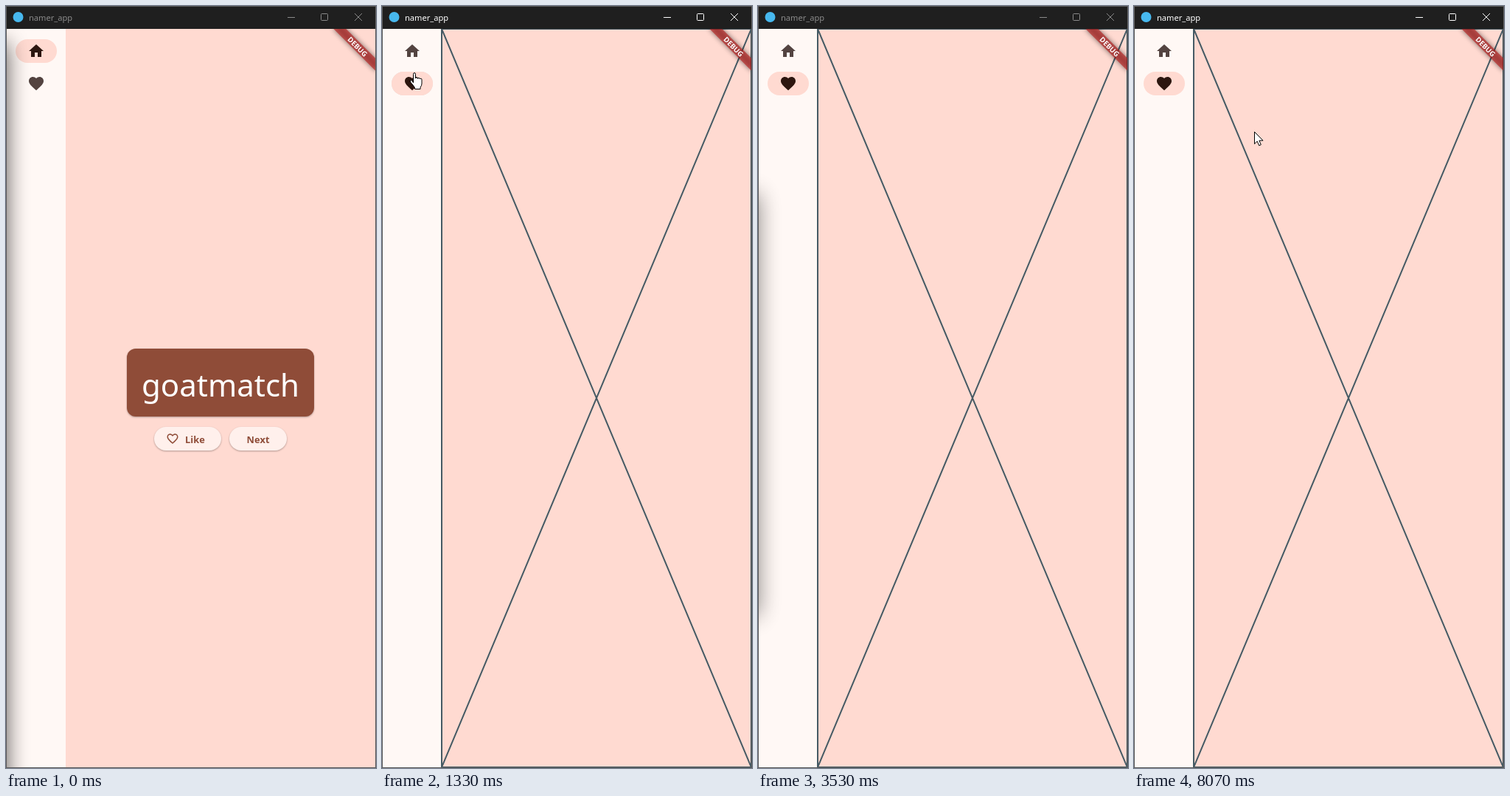
Animation, 502 px wide and 1032 px high, one loop 10000 ms. Source, as an HTML page:

```html
<!DOCTYPE html>
<html lang="en">
<head>
<meta charset="utf-8">
<title>namer_app</title>
<style>
html, body { margin: 0; width: 100%; height: 100%; overflow: hidden; background: #1f1f1f; }
svg { display: block; }
text { font-family: "Noto Sans", "Open Sans", sans-serif; }
.button { fill: #fff0ec; filter: drop-shadow(0 1px 1px rgba(0, 0, 0, .3)); }
.label { fill: #8f4c38; font-size: 12.8px; font-weight: 600; letter-spacing: .1px; }
.pill { fill: #ffdad1; }
.ink { fill: #221a18; }
.cursor { fill: #fff; stroke: #000; stroke-linejoin: round; }
</style>
</head>
<body>
<svg width="502" height="1032" viewBox="0 0 502 1032">
  <defs>
    <clipPath id="client"><rect x="1" y="31" width="500" height="1000"/></clipPath>
    <filter id="soft" x="-30%" y="-200%" width="160%" height="500%"><feGaussianBlur stdDeviation="3.96"/></filter>
    <filter id="wide" x="-30%" y="-30%" width="160%" height="160%"><feGaussianBlur stdDeviation="15"/></filter>
  </defs>

  <rect width="502" height="1032" fill="#1f1f1f"/>
  <circle cx="16.5" cy="15" r="7" fill="#47b8ee"/>
  <g id="bar">
    <text x="31" y="20" font-size="11.1" fill="currentColor">namer_app</text>
    <g fill="none" stroke="currentColor">
      <path d="M382 15.5h10M473 10l10 10M483 10l-10 10"/>
      <rect x="427.5" y="10.5" width="9" height="9" rx="1"/>
    </g>
  </g>

  <g clip-path="url(#client)">
    <rect x="1" y="31" width="80" height="1000" fill="#fff8f5"/>
    <rect x="81" y="31" width="420" height="1000" fill="#ffdad1"/>

    <g class="item">
      <rect class="ink" x="13" y="45" width="56" height="32" rx="16"/>
      <rect class="pill" x="13" y="45" width="56" height="32" rx="16"/>
      <path class="icon" transform="translate(29 49)" d="M10 20v-6h4v6h5v-8h3L12 3 2 12h3v8z"/>
    </g>
    <g class="item">
      <rect class="ink" x="13" y="89" width="56" height="32" rx="16"/>
      <rect class="pill" x="13" y="89" width="56" height="32" rx="16"/>
      <path class="icon" transform="translate(29 93)" d="M12 21.35l-1.45-1.32C5.4 15.36 2 12.28 2 8.5 2 5.42 4.42 3 7.5 3c1.74 0 3.41.81 4.5 2.09C13.09 3.81 14.76 3 16.5 3 19.58 3 22 5.42 22 8.5c0 3.78-3.4 6.86-8.55 11.54z"/>
    </g>

    <g id="words">
      <rect x="164" y="464" width="254" height="92" rx="12" fill="#8f4c38" style="filter:drop-shadow(0 1px 1px rgba(0,0,0,.3))"/>
      <text x="291" y="529" font-size="42" fill="#fff" text-anchor="middle">goatmatch</text>
      <rect class="button" x="201" y="570" width="91" height="32" rx="16"/>
      <rect class="button" x="303" y="570" width="78" height="32" rx="16"/>
      <path transform="translate(217 577) scale(.75)" fill="#8f4c38" d="M16.5 3c-1.74 0-3.41.81-4.5 2.09C10.91 3.81 9.24 3 7.5 3 4.42 3 2 5.42 2 8.5c0 3.78 3.4 6.86 8.55 11.54L12 21.35l1.45-1.32C18.6 15.36 22 12.28 22 8.5 22 5.42 19.58 3 16.5 3zm-4.4 15.55-.1.1-.1-.1C7.14 14.24 4 11.39 4 8.5 4 6.5 5.5 5 7.5 5c1.54 0 3.04.99 3.57 2.36h1.87C13.46 5.99 14.96 5 16.5 5c2 0 3.5 1.5 3.5 3.5 0 2.89-3.14 5.74-7.9 10.05z"/>
      <text class="label" x="243" y="592">Like</text>
      <text class="label" x="342" y="592" text-anchor="middle">Next</text>
    </g>
    <path id="empty" d="M81 31H501V1031H81zL501 1031M501 31L81 1031" fill="none" stroke="#455a64" stroke-width="2"/>

    <g transform="translate(501 31) rotate(45)">
      <rect x="-40" y="28" width="80" height="12" opacity=".5" filter="url(#soft)"/>
      <rect x="-40" y="28" width="80" height="12" fill="#b71c1c" fill-opacity=".627"/>
      <text y="37.6" font-size="9.6" font-weight="900" fill="#fff" text-anchor="middle">DEBUG</text>
    </g>

    <rect id="shade" x="-300" width="301" filter="url(#wide)"/>
  </g>
  <rect x=".5" y=".5" width="501" height="1031" fill="none" stroke="#5c5c5c"/>

  <path id="arrow" class="cursor" d="M.5.5V16.8L4.2 13.2 6.7 19l2.6-1.1L6.9 12.2H12z"/>
  <path id="hand" class="cursor" d="M5.5 14V2.5Q5.5.5 7 .5T8.5 2.5V8Q8.5 6.8 10 6.8T11.5 8.4Q11.7 7.4 13 7.4T14.5 9Q14.8 8.2 15.7 8.2 17 8.2 17 9.8V15Q17 18 15 20V22.5H7.5V20.5Q5 17 2 13.5 .5 11.8 1.6 10.9 2.8 10 4.2 11.6z"/>
</svg>

<script>
const LOOP = 10000, STEP = 1000 / 15;
const $ = id => document.getElementById(id);
const items = [...document.querySelectorAll('.item')].map(g => ({
  ink: g.querySelector('.ink'), pill: g.querySelector('.pill'), icon: g.querySelector('.icon')
}));
const clamp = v => Math.min(1, Math.max(0, v));
const ease = p => p < .5 ? 3.12 * p * p : 1 - 1.76 * (1 - p) ** 3;

// taps: [time, chosen item]
const taps = [[-1000, 0], [1133.4, 1], [1900, 0], [2533.4, 1]];

// pointer tracks: [time, x, y]
const tracks = {
  arrow: [
    [[200, 141, 18], [333, 118, 58], [467, 98, 88], [600, 87, 101], [800, 87, 101], [866, 62, 97], [930, 50, 95]],
    [[7000, 261, 619], [7333, 205, 470], [7667, 108, 270], [7867, 140, 195], [8000, 168, 171], [8066, 163, 170], [LOOP, 163, 170]]
  ],
  hand: [
    [[930, 37, 93], [1200, 37, 93], [1333, 37, 90], [1600, 37, 90], [1800, 37, 57],
     [2130, 37, 57], [2330, 37, 92], [3465, 37, 92]]
  ]
};

function locate(track, t) {
  if (t < track[0][0] || t >= track[track.length - 1][0]) return null;
  const i = track.findIndex(k => k[0] > t);
  const [a, b] = [track[i - 1], track[i]];
  const p = (t - a[0]) / (b[0] - a[0]);
  return [a[1] + (b[1] - a[1]) * p, a[2] + (b[2] - a[2]) * p];
}

function place(id, t) {
  const at = tracks[id].map(k => locate(k, t)).find(Boolean);
  $(id).style.display = at ? '' : 'none';
  if (at) $(id).setAttribute('transform', `translate(${Math.round(at[0])} ${Math.round(at[1])})`);
  return at;
}

function drawRail(t, hand) {
  const [start, chosen] = taps.filter(k => k[0] <= t).pop();
  const p = clamp((t - start) / 200);
  const hover = hand && t > 1130 ? (hand[1] < 78 ? 0 : 1) : -1;
  items.forEach(({ ink, pill, icon }, i) => {
    const on = i === chosen;
    pill.style.opacity = on ? clamp(p * 2) : 1 - p;
    const scale = on ? .4 + .6 * ease(p) : 1;
    pill.setAttribute('transform', `translate(41 0) scale(${scale} 1) translate(-41 0)`);
    ink.style.opacity = i !== hover ? 0 : on && p < 1 ? .12 : .05;
    icon.style.fill = on ? '#2c160f' : '#534340';
  });
  $('words').style.display = chosen ? 'none' : '';
  $('empty').style.display = chosen ? '' : 'none';
}

function drawWindow(t) {
  const early = t < 1130, away = t > 3460 && t < 6730;
  $('bar').style.color = early || away ? '#8a8a8a' : '#fff';
  const shade = $('shade');
  shade.setAttribute('y', early ? 50 : 255);
  shade.setAttribute('height', early ? 1050 : 570);
  shade.style.opacity = early ? .65 : away ? (t < 3530 ? .25 : .45) : 0;
}

function draw(now) {
  const t = Math.floor((now % LOOP + 4) / STEP) * STEP;
  place('arrow', t);
  drawRail(t, place('hand', t));
  drawWindow(t);
}

function tick() {
  draw(performance.now() - begin);
  requestAnimationFrame(tick);
}
const begin = performance.now();
tick();
</script>
</body>
</html>
```
